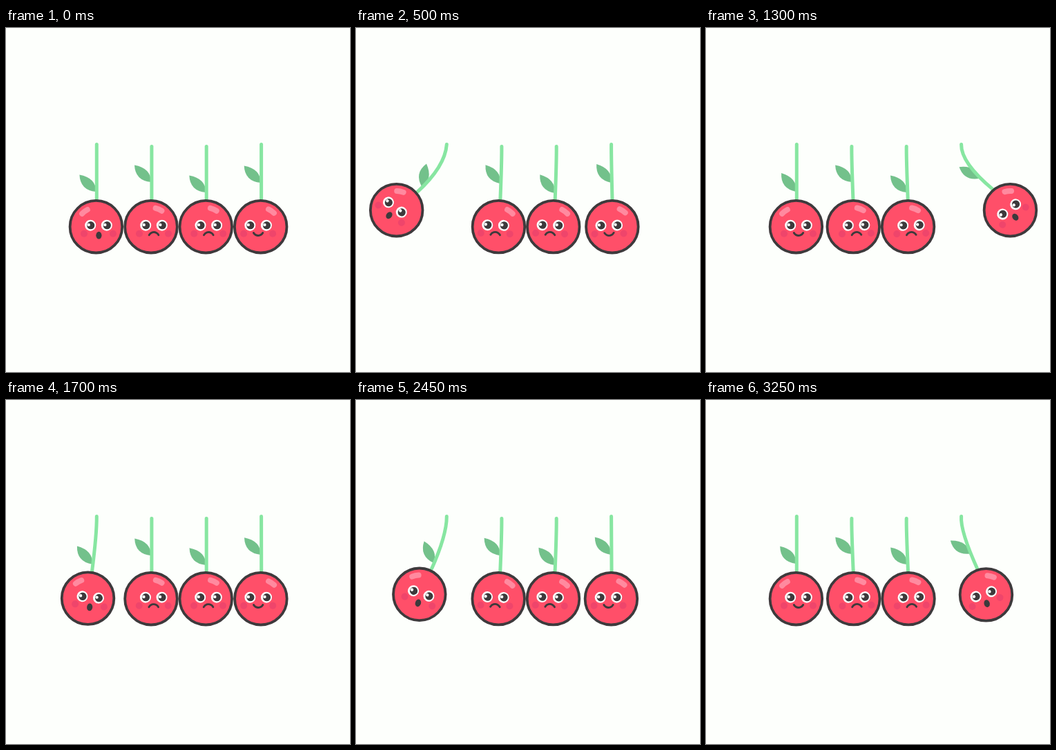
Recreate the animation shown at these times as an HTML page with a canvas. Size 498 by 498 pixels, loop 3.3 s.

```html
<!DOCTYPE html>
<html>
<head>
<meta charset="utf-8">
<style>
html, body { margin: 0; width: 100%; height: 100%; overflow: hidden; background: #fdfffc; }
canvas { display: block; width: 498px; height: 498px; }
</style>
</head>
<body>
<canvas id="stage" width="498" height="498"></canvas>
<script>
const ctx = document.getElementById('stage').getContext('2d');
const LOOP = 3300, CYCLE = 1650, START = 28, LEFT_TIME = 863;
const SWING = 72, ROPE = 119.6, REST_Y = 287.7, RADIUS = 37.8;
const BG = '#fdfffc', RED = '#ff4f69', DARK = '#3d3a3c', BLUSH = '#ef456b',
  SHINE = '#ff8a9f', STEM = '#87e6a1', LEAF = '#73c18b';

const cherries = [
  { x: 130.4, top: 168.5, leafAt: 0.9, shine: -127 },
  { x: 210, top: 171.5, leafAt: 0.77, shine: -61 },
  { x: 289.3, top: 171.5, leafAt: 0.91, shine: -61 },
  { x: 368.7, top: 168.5, leafAt: 0.78, shine: -56 }
];

const rad = d => d * Math.PI / 180;
const mix = (a, b, k) => a + (b - a) * k;

function dot(x, y, r, color, ry = r) {
  ctx.fillStyle = color;
  ctx.beginPath();
  ctx.ellipse(x, y, r, ry, 0, 0, 7);
  ctx.fill();
}

function arc(x, y, r, from, to, color, width) {
  ctx.strokeStyle = color;
  ctx.lineWidth = width;
  ctx.beginPath();
  ctx.arc(x, y, r, rad(from), rad(to));
  ctx.stroke();
}

function drawLeaf(x, y, turn) {
  ctx.save();
  ctx.translate(x, y);
  ctx.rotate(turn);
  ctx.fillStyle = LEAF;
  ctx.beginPath();
  ctx.moveTo(0, 0);
  ctx.quadraticCurveTo(0, -20, -24, -24.5);
  ctx.quadraticCurveTo(-23, -2, 0, 0);
  ctx.fill();
  ctx.restore();
}

function drawFace(shift, mood) {
  ctx.translate(shift, 0);
  for (const side of [-1, 1]) {
    dot(side * 21, 10, 5, BLUSH);
    dot(side * 11.8, -2, 8, '#fff');
    dot(side * 11.8 + 0.5, -2, 5.6, DARK);
    dot(side * 11.8 - 2.5, -2.8, 2.2, '#fff');
  }
  if (mood === 'gasp') dot(0.4, 12.5, 4.1, DARK, 5.4);
  else if (mood === 'sad') arc(0, 15.6, 7.7, 208, 332, DARK, 2.9);
  else arc(0, 5.2, 7.6, 28, 152, DARK, 2.9);
}

// dx is the sideways distance from rest; positive angles swing left
function drawCherry(c, dx, shift, mood, leafTurn, shine = c.shine) {
  const tilt = Math.asin(-dx / ROPE);
  const rope = REST_Y - c.top;
  const cx = c.x - rope * Math.sin(tilt), cy = c.top + rope * Math.cos(tilt);
  const toLeft = tilt > 0;
  const joint = tilt * (toLeft ? 1.3 : 1.1), bend = tilt * (toLeft ? 1.28 : 1.36);
  const pull = toLeft ? 55 : 61;
  const ex = cx + 39 * Math.sin(joint), ey = cy - 39 * Math.cos(joint);
  const qx = ex + pull * Math.sin(bend), qy = ey - pull * Math.cos(bend);
  const onStem = (a, b, d, k) => mix(mix(a, b, k), mix(b, d, k), k);

  drawLeaf(onStem(c.x, qx, ex, c.leafAt), onStem(c.top, qy, ey, c.leafAt), leafTurn);
  ctx.strokeStyle = STEM;
  ctx.lineWidth = 5;
  ctx.beginPath();
  ctx.moveTo(c.x + 0.9, c.top);
  ctx.quadraticCurveTo(qx + 0.9, qy, ex + 0.9, ey);
  ctx.stroke();

  dot(cx, cy, RADIUS, RED);
  ctx.save();
  ctx.translate(cx, cy);
  ctx.save();
  ctx.rotate(joint);
  arc(0, 0, 27.7, shine - 10, shine + 10, SHINE, 8);
  ctx.restore();
  ctx.rotate(tilt);
  drawFace(shift, mood);
  ctx.restore();
  arc(cx, cy, RADIUS, 0, 360, DARK, 3.8);
}

function draw(time) {
  const t = time % LOOP;
  const local = t < START ? 0 : (t - START) % CYCLE;
  const left = local < LEFT_TIME;
  const u = left ? local / LEFT_TIME : (local - LEFT_TIME) / (CYCLE - LEFT_TIME);
  const dir = left ? -1 : 1;

  const out = 1 - Math.pow(Math.abs(2 * u - 1), 3.3);
  const sway = dir * 5 * Math.pow(Math.min(1, u / 0.65), 1.8) * (1 - Math.pow(u, 14));
  const wave = Math.sin(Math.PI * u);
  const k = Math.min(1, u / 0.25);
  const look = dir * mix(-4, 4.4, k * k * (3 - 2 * k));
  const deg = Math.asin(SWING * out / ROPE);

  ctx.fillStyle = BG;
  ctx.fillRect(0, 0, 498, 498);
  ctx.lineCap = 'round';

  const [a, b, c, d] = cherries;
  if (left) drawCherry(a, -SWING * out, 3.6 - 8 * Math.pow(out, 2.5), 'gasp', deg * (0.65 + 0.85 * out));
  else drawCherry(a, 0, 3.6, 'smile', rad(6 * wave));

  const nudge = left ? rad(6 * wave) : 0;
  for (const mid of [b, c]) drawCherry(mid, sway, look, 'sad', nudge, mid.shine - 1.3 * look);

  if (left) drawCherry(d, 2.2 * wave, -3.6 - wave, 'smile', rad(6 * wave));
  else drawCherry(d, SWING * out, -3.6 + 3 * Math.pow(out, 3), 'gasp', -deg * (0.9 - 0.44 * out));
}

const begin = performance.now();
function tick() {
  draw(performance.now() - begin);
  requestAnimationFrame(tick);
}
tick();
</script>
</body>
</html>
```
